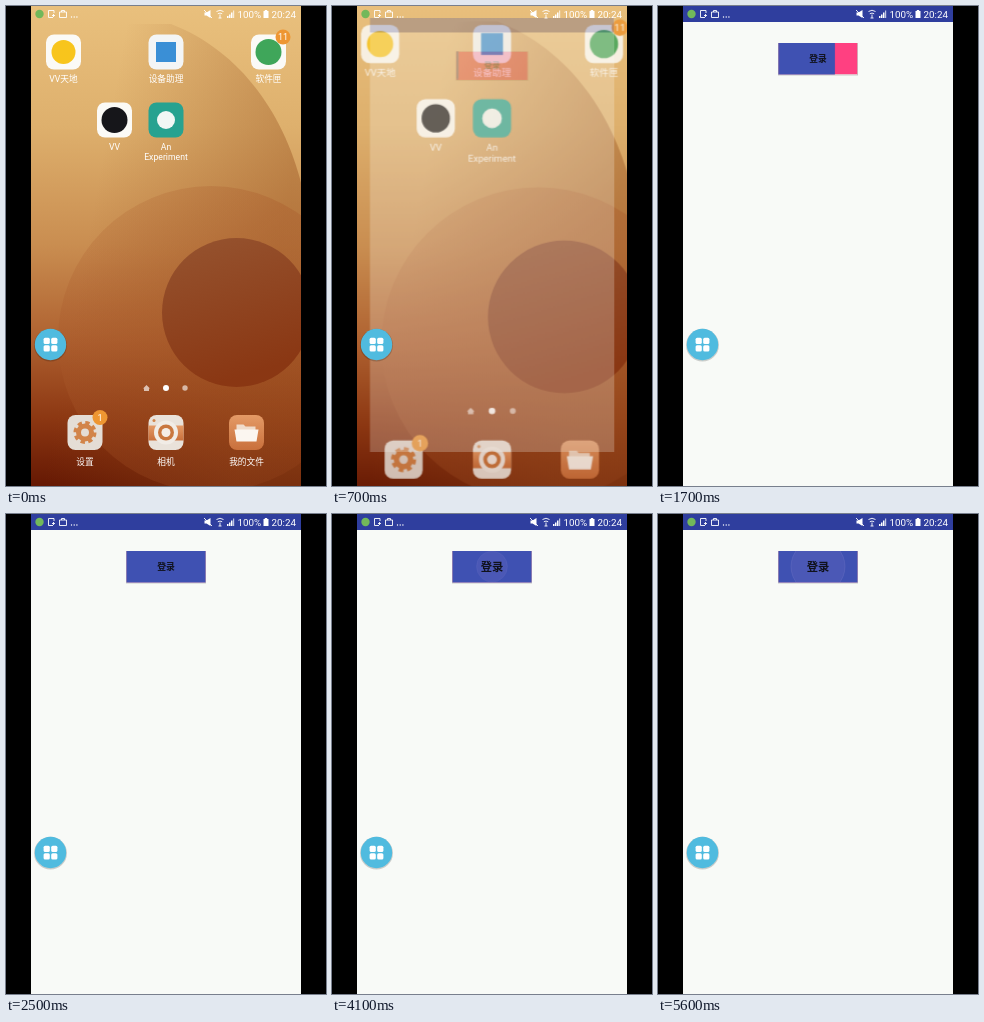
These frames come from a looping animation (320 by 480 pixels, 5700 ms). An HTML page:

```html
<!DOCTYPE html>
<html lang="zh-CN">
<head>
<meta charset="utf-8">
<title>登录</title>
<style>
html, body { margin: 0; width: 100%; height: 100%; overflow: hidden; background: #000; }
svg { display: block; width: 100vw; height: 100vh; }
text { font-family: Roboto, "Noto Sans CJK SC", "Noto Sans CJK", sans-serif; text-anchor: middle; }
.label { font-size: 8.7px; fill: #fff; }
.badge { font-size: 9px; fill: #fff; }
.clock { font-size: 9.8px; fill: #fff; text-anchor: start; }
.login { font-size: 8.7px; font-weight: 700; fill: #10121c; }

/* Every motion advances in 100 ms steps. */
.wall, .home, .app, .fill, .grow, .ripple {
  animation: 5700ms step-end -4ms infinite;
}
.wall { transform-origin: 160px 130px; animation-name: wall; }
.home { transform-origin: 160px 133px; animation-name: home; }
.app { transform-origin: 160px 125px; animation-name: app; }
.fill { transform-origin: 120.5px 37px; animation-name: fill; }
.grow { transform-origin: 0 0; animation-name: grow; }
.ripple { transform-origin: 160px 52.5px; animation-name: ripple; }

@keyframes wall {
  0% { transform: scale(1); }
  10.526% { transform: scale(1.01); }
  12.281%, 100% { transform: scale(1.025); }
}
@keyframes home {
  0% { transform: scale(1); opacity: 1; }
  8.772% { transform: scale(1.01); opacity: 1; }
  10.526% { transform: scale(1.04); opacity: .96; }
  12.281% { transform: scale(1.092); opacity: .84; }
  14.035% { transform: scale(1.33); opacity: .5; }
  15.789%, 100% { transform: scale(1.4); opacity: 0; }
}
@keyframes app {
  0% { transform: scale(.8); opacity: 0; }
  10.526% { transform: scale(.85); opacity: .06; }
  12.281% { transform: scale(.904); opacity: .24; }
  14.035% { transform: scale(.996); opacity: .975; }
  15.789%, 100% { transform: scale(1); opacity: 1; }
}
@keyframes fill {
  0% { transform: scaleX(0); }
  12.281% { transform: scaleX(.035); animation-timing-function: steps(10); }
  29.825% { transform: scaleX(.715); animation-timing-function: steps(5); }
  38.596%, 100% { transform: scaleX(1); }
}
@keyframes grow {
  0% { transform: scale(1); }
  42.105% { transform: scale(1); animation-timing-function: steps(6); }
  52.632% { transform: scale(1.07); animation-timing-function: steps(3); }
  57.895% { transform: scale(1.16); animation-timing-function: steps(3); }
  63.158%, 100% { transform: scale(1.3); }
}
@keyframes ripple {
  0% { transform: scale(0); opacity: 1; }
  63.158% { transform: scale(0); opacity: 1; animation-timing-function: steps(6); }
  73.684% { transform: scale(.685); opacity: 1; animation-timing-function: steps(3); }
  78.947% { transform: scale(1); opacity: 1; }
  80.702% { transform: scale(1); opacity: .6; }
  82.456% { transform: scale(1); opacity: .3; }
  84.211% { transform: scale(0); opacity: 1; animation-timing-function: steps(6); }
  94.737% { transform: scale(.815); opacity: 1; animation-timing-function: steps(2); }
  98.246%, 100% { transform: scale(1); opacity: 1; }
}
</style>
</head>
<body>
<svg viewBox="0 0 320 480">
  <defs>
    <clipPath id="screen"><rect x="25" width="270" height="480"/></clipPath>
    <clipPath id="button"><rect x="120.5" y="37" width="79" height="31.5"/></clipPath>
    <linearGradient id="sky" x2="0" y2="1">
      <stop offset="0" stop-color="#e9c07d"/>
      <stop offset=".25" stop-color="#deb06d"/>
      <stop offset=".5" stop-color="#c98d50"/>
      <stop offset=".7" stop-color="#ae602f"/>
      <stop offset=".86" stop-color="#8c3712"/>
      <stop offset="1" stop-color="#651803"/>
    </linearGradient>
    <linearGradient id="sweep" x1=".35" x2="1" y2=".2">
      <stop offset="0" stop-color="#96501e" stop-opacity="0"/>
      <stop offset="1" stop-color="#96501e" stop-opacity=".42"/>
    </linearGradient>
    <linearGradient id="ring" x2=".8" y2="1">
      <stop offset="0" stop-color="#a8582a" stop-opacity=".1"/>
      <stop offset=".4" stop-color="#a8582a" stop-opacity=".34"/>
      <stop offset="1" stop-color="#a04a20" stop-opacity=".2"/>
    </linearGradient>
    <linearGradient id="disc" x2=".3" y2="1">
      <stop offset="0" stop-color="#965430"/>
      <stop offset="1" stop-color="#8a3713"/>
    </linearGradient>
    <linearGradient id="copper" x2="0" y2="1">
      <stop offset="0" stop-color="#e49a66"/>
      <stop offset="1" stop-color="#c9703c"/>
    </linearGradient>
    <rect id="tile" x="-17.5" y="-17.5" width="35" height="35" rx="8"/>
  </defs>

  <rect width="320" height="480"/>
  <g clip-path="url(#screen)">
    <g class="wall">
      <rect x="25" width="270" height="480" fill="url(#sky)"/>
      <path d="M165 18C235 45 280 110 297 185V480H25V18Z" fill="url(#sweep)"/>
      <circle cx="205" cy="333" r="153" fill="url(#ring)"/>
      <circle cx="230.5" cy="306.5" r="74.5" fill="url(#disc)"/>
    </g>

    <g class="home">
      <g transform="translate(57.5 46)">
        <use href="#tile" fill="#fbfaf6"/>
        <circle r="12" fill="#f8c51c"/>
        <text class="label" y="29.5">VV天地</text>
      </g>
      <g transform="translate(160 46)">
        <use href="#tile" fill="#f3f5f6"/>
        <rect x="-10" y="-10" width="20" height="20" fill="#3a8fd6"/>
        <text class="label" y="29.5">设备助理</text>
      </g>
      <g transform="translate(262.5 46)">
        <use href="#tile" fill="#fbfaf6"/>
        <circle r="13" fill="#3fa65a"/>
        <text class="label" y="29.5">软件匣</text>
        <circle cx="14.5" cy="-15" r="7.5" fill="#ee9632"/>
        <text class="badge" x="14.5" y="-11.8">11</text>
      </g>
      <g transform="translate(108.5 114)">
        <use href="#tile" fill="#fbfaf6"/>
        <circle r="13" fill="#16161a"/>
        <text class="label" y="29.5">VV</text>
      </g>
      <g transform="translate(160 114)">
        <use href="#tile" fill="#27a290"/>
        <circle r="9" fill="#f2f7f5"/>
        <text class="label" y="29.5">An</text>
        <text class="label" y="40">Experiment</text>
      </g>

      <g fill="#fff">
        <path d="M137 382.500L140.500 379L144 382.500H143V385H138V382.500Z" opacity=".65"/>
        <circle cx="160" cy="382" r="3"/>
        <circle cx="179" cy="382" r="2.700" opacity=".6"/>
      </g>

      <g transform="translate(79 426.500)">
        <use href="#tile" fill="#e4ddd5"/>
        <circle r="9.500" fill="none" stroke="#d28449" stroke-width="4" stroke-dasharray="4.200 3.260"/>
        <circle r="6.500" fill="none" stroke="#d28449" stroke-width="5"/>
        <text class="label" y="32.500">设置</text>
        <circle cx="15" cy="-15" r="7.500" fill="#ee9632"/>
        <text class="badge" x="15" y="-11.800">1</text>
      </g>
      <g transform="translate(160 426.500)">
        <use href="#tile" fill="#e9e2da"/>
        <path d="M-17.500-7H17.500V8H-17.500Z" fill="url(#copper)"/>
        <circle r="12" fill="#f1ece6"/>
        <circle r="8" fill="#c9773f"/>
        <circle r="4.500" fill="#f5eee7"/>
        <circle cx="-12" cy="-12" r="1.500" fill="#d28449"/>
        <text class="label" y="32.500">相机</text>
      </g>
      <g transform="translate(240.500 426.500)">
        <use href="#tile" fill="url(#copper)"/>
        <path d="M-10-8H-3L-1-6H9V8H-10Z" fill="#f0dccb"/>
        <path d="M-12-3H12L10 9H-10Z" fill="#fbf6f0"/>
        <text class="label" y="32.500">我的文件</text>
      </g>
    </g>

    <g class="app">
      <rect x="25" width="270" height="480" fill="#f8faf7"/>
      <rect x="25" width="270" height="16" fill="#2f3e9e"/>
      <rect x="120.500" y="37.500" width="79" height="31.500" fill="none" stroke="#000" stroke-opacity=".2"/>
      <g clip-path="url(#button)">
        <rect x="120.500" y="37" width="79" height="31.500" fill="#ff4081"/>
        <rect class="fill" x="120.500" y="37" width="79" height="31.500" fill="#3f51b2"/>
        <circle class="ripple" cx="160" cy="52.500" r="27" fill="#a08cd0" fill-opacity=".13" stroke="#a8a0e0" stroke-opacity=".2" stroke-width=".8"/>
      </g>
      <g transform="translate(160 52.700)">
        <text class="login grow" y="3.200">登录</text>
      </g>
    </g>

    <g fill="none" stroke="#fff" stroke-width=".9">
      <circle cx="33.500" cy="8" r="4.200" fill="#72b85a" stroke="none"/>
      <path d="M47 11.500H42.500V4.500H48V7M46 9.500H49M47.500 8V11"/>
      <path d="M53.500 6H60.500V11.500H53.500ZM55.500 6V4.500H58.500V6"/>
      <g fill="#fff" stroke="none">
        <circle cx="65.500" cy="11" r=".7"/>
        <circle cx="68.200" cy="11" r=".7"/>
        <circle cx="70.900" cy="11" r=".7"/>
        <path d="M198.500 6.500H200.500L204.500 4V12L200.500 9.500H198.500Z"/>
        <path d="M221 12V10H222.500V12ZM223 12V8.500H224.500V12ZM225 12V6.500H226.500V12Z"/>
        <path d="M227 12V4.500H228.200V12Z" opacity=".7"/>
        <path d="M257.500 5H258.800V4H261.200V5H262.500V12H257.500Z"/>
      </g>
      <path d="M198 4L206 12"/>
      <path d="M210.500 5.500Q214 3 217.500 5.500M211.800 7.800Q214 6.300 216.200 7.800M214 8.500V12M212.500 12H215.500"/>
    </g>
    <text class="clock" x="231.500" y="11.700">100%</text>
    <text class="clock" x="265.500" y="11.700">20:24</text>

    <circle cx="44.500" cy="339.200" r="16.400" fill="#000" opacity=".18"/>
    <circle cx="44.500" cy="338.500" r="15.700" fill="#50bbdf"/>
    <g fill="#fff">
      <rect x="37.600" y="331.700" width="6.200" height="6.200" rx="1.500"/>
      <rect x="45.200" y="331.700" width="6.200" height="6.200" rx="1.500"/>
      <rect x="37.600" y="339.200" width="6.200" height="6.200" rx="1.500"/>
      <rect x="45.200" y="339.200" width="6.200" height="6.200" rx="1.500"/>
    </g>
  </g>
</svg>
</body>
</html>
```
